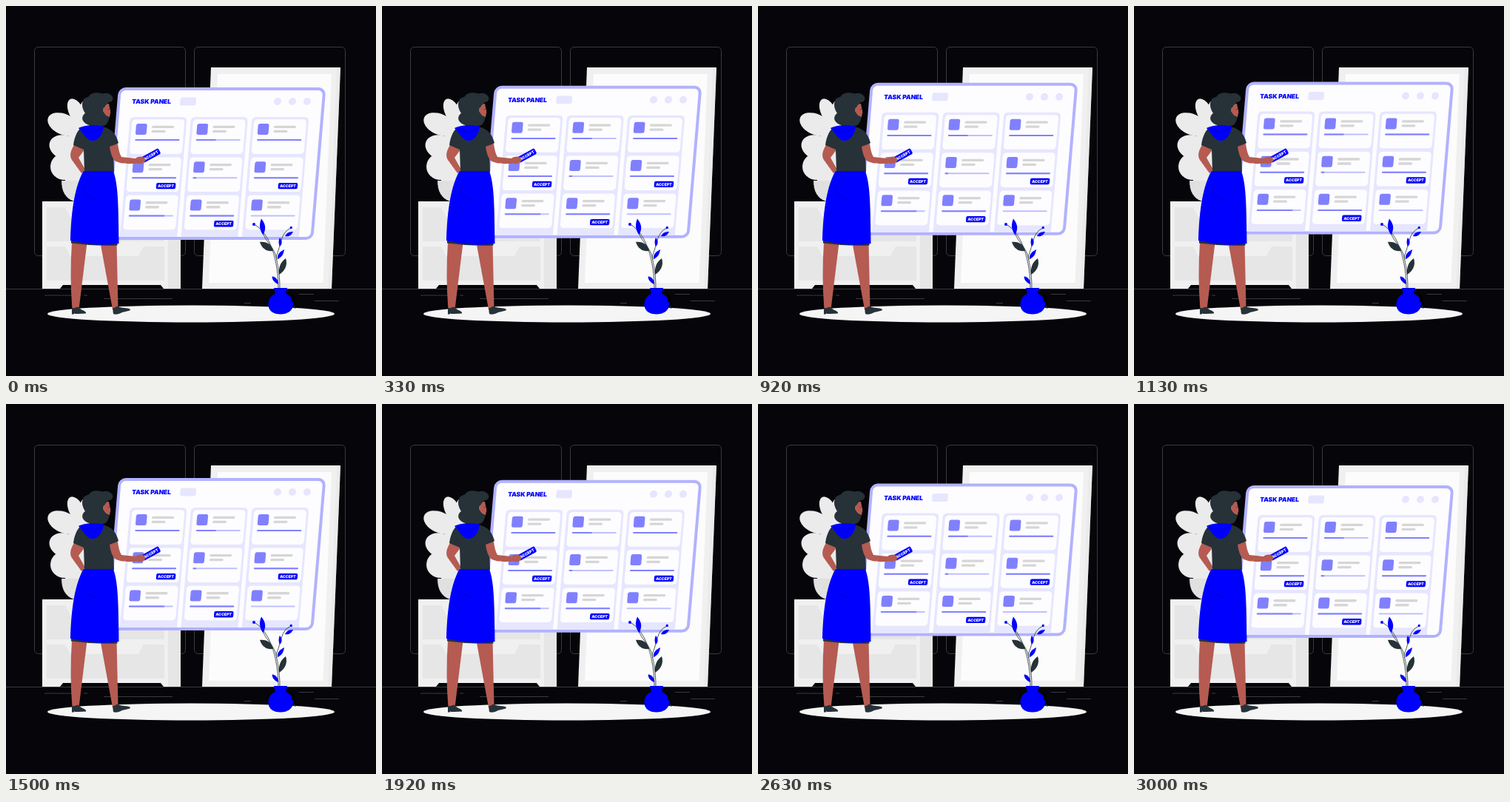
An HTML page that plays this animation: 500x500 px, repeating every 3.04 s.

```html
<!DOCTYPE html>
<html lang="en">
<head>
<meta charset="utf-8">
<title>Task panel</title>
<style>
  html, body { margin: 0; width: 100%; height: 100%; overflow: hidden; background: #060509; }
  svg { display: block; width: 100vw; height: 100vh; }
  text { font-family: Inter, "Liberation Sans", sans-serif; font-weight: 900; }
  .blue { fill: #0000ff; }
  .dark { fill: #263238; }
  .skin { fill: #b55b52; }
  .lilac { fill: #e6e6ff; }
  .violet { fill: #8080ff; }
  .thin { fill: none; stroke: #3b3b3f; stroke-width: 1; }
  .stem { fill: none; stroke: #263238; stroke-width: .8; }
</style>
</head>
<body>
<svg viewBox="0 0 500 500">
  <!-- room -->
  <g class="thin">
    <rect x="38.5" y="55.5" width="204" height="282" rx="5"/>
    <rect x="254.5" y="55.5" width="204" height="282" rx="5"/>
    <path d="M0 382.5H500M52 391H92M105 391H110M132 395.5H225M396 389.5H416M417 398.5H450M322 401.5H331"/>
  </g>

  <!-- canvas leaning on the wall -->
  <path fill="#f0f0f0" d="M277 83H452L440 382H265Z"/>
  <path fill="#e8e8e8" d="M452 83L440 382H435L447 83Z" opacity=".5"/>
  <path fill="#fcfcfc" d="M286 92H440L428.500 374H274Z"/>

  <!-- pale plant -->
  <g fill="#ebebeb">
    <ellipse cx="95" cy="143" rx="10" ry="19" transform="rotate(-25 95 143)"/>
    <ellipse cx="78" cy="160" rx="23" ry="14" transform="rotate(24 78 160)"/>
    <ellipse cx="79" cy="191" rx="21" ry="16" transform="rotate(20 79 191)"/>
    <ellipse cx="79" cy="217" rx="19" ry="18"/>
    <ellipse cx="106" cy="152" rx="8" ry="24"/>
    <path d="M86 160H106V236H80Z"/>
  </g>
  <path fill="#e0e0e0" d="M75 236H115V264H92C80 260 75 250 75 236Z"/>

  <!-- cabinet -->
  <path fill="#f0f0f0" d="M49 264H219V382H213L209 377H77L73 382H49Z"/>
  <path fill="#e6e6e6" d="M219 264H236V382H219Z"/>
  <g fill="#e6e6e6">
    <path id="drawer" d="M55 272H80L87 285H179L186 272H214V318H55Z"/>
    <use href="#drawer" y="53"/>
  </g>
  <ellipse cx="250" cy="416" rx="194" ry="11.500" fill="#f5f5f5"/>

  <g id="panel">
    <rect x="154" y="112" width="276.500" height="202" rx="8" fill="#fdfdff" stroke="#b2b2ff" stroke-width="4"/>
    <text x="171.800" y="132.300" font-size="8.400" class="blue">TASK PANEL</text>
    <rect x="237" y="123.500" width="21.500" height="11" rx="2.500" class="lilac"/>
    <g class="lilac">
      <circle cx="368.600" cy="129" r="5"/><circle cx="388.600" cy="129" r="5"/><circle cx="408.600" cy="129" r="5"/>
    </g>
    <g id="cards"></g>
  </g>

  <!-- vase and sprigs -->
  <path class="stem" d="M368 382C368 345 357 306 335 295M370 382C370 350 363 340 366 336C372 322 371 306 385 300M366 343C363 325 351 320 347 306"/>
  <g class="dark">
    <path d="M343 319C353 318 359 323 361 331C352 332 346 328 343 319Z"/>
    <path d="M378 341C381 350 377 358 369 363C368 353 371 346 378 341Z"/>
  </g>
  <g class="blue">
    <circle cx="335" cy="295" r="2"/><circle cx="385.300" cy="299.500" r="1.700"/>
    <path d="M345 287.500C352 296 351 302 347.500 309.500C342 302 342 295 345 287.500Z"/>
    <path d="M388 305C385 311 381 312 377 311C379 307 382 305 388 305Z"/>
    <path d="M370 313C374 318 373 322 370 325C368 321 368 317 370 313Z"/>
    <path d="M376 329C375 336 372 340 367 342C366 336 370 332 376 329Z"/>
    <path d="M359.500 365.500C365 366 368 370 368 376C363 374 360 371 359.500 365.500Z"/>
    <path d="M362 381H380L378 389C385 391 388 397 388 403C388 412 380 416.500 371 416.500C361 416.500 354.500 412 354.500 403C354.500 397 358 391 364 389Z"/>
  </g>
  <path d="M385 390Q391 394 387 398Q393 402 388 407" fill="none" stroke="#000" stroke-width="2"/>
  <path d="M389 405L391 409" stroke="#263238" stroke-width="1"/>

  <!-- woman -->
  <g class="skin">
    <path d="M89 320H109.500L98.500 410H89.500C87 380 87 350 89 320Z"/>
    <path d="M127.500 320H149.500L151.500 408L144 410Z"/>
    <path d="M93 186C87 196 85.500 202 89 208L102 226L107 221L98 205L107 193Z"/>
  </g>
  <g class="dark">
    <path d="M89 408C93 409 96 406 98 407C101 411 106 411 108 414V415.500L98 416H93L92 415V416.500H89Z"/>
    <path d="M144 408C147 409 149 405 152 406C157 409 163 407 168 410C168 413 160 412 155 415C151 417 147 417 145 416Z"/>
    <path d="M88 314H150.500V323.500C130 324.500 108 323 88 320.500Z"/>
    <path d="M101 165C95 170 92 180 91 188L105 194L106 224H146L145 190L152 185C149 174 144 166 130 163Z"/>
  </g>
  <path class="blue" d="M104.500 223H145C151 240 152 262 152.500 321C126 325 107 321 87 317C88 285 91 248 104.500 223Z"/>
  <path d="M105 247C107 256 115 262 127 262" fill="none" stroke="#0000b0" stroke-width=".7"/>
  <path class="skin" d="M131 139C132 134 136 132 139 132C140 138 142 143 141 145L140 150C137 152 134 149 131 145Z"/>
  <path class="dark" d="M104 128C106 123 110 124 112 122C116 116 125 117 130 118.500C137 116 144 120 144.500 125C144 128 142 130 139 130C137 132 135 133 133 137C130 137 130 142 133 145C135 149 138 149 140 150C138 155 138 161 131 162C121 164 108 162 104 155C102 151 104 147 107 145C103 139 102 133 104 128Z"/>
  <path d="M137.500 140L139.500 139" stroke="#263238" stroke-width=".8"/>
  <path class="blue" d="M98 165C107 160 126 160 132 163C131 173 125 182 117 182C109 182 106 174 98 165Z"/>
  <path d="M103 166C111 172 121 171 129 165" fill="none" stroke="#0000b0" stroke-width=".7"/>

  <!-- held label, hand over it -->
  <g transform="translate(196 202) rotate(-29)">
    <rect x="-13" y="-4.200" width="26" height="8.400" rx="1.800" class="blue"/>
    <text y="1.900" font-size="5.200" fill="#fff" text-anchor="middle">ACCEPT</text>
  </g>
  <path class="skin" d="M140 190L151 186C152 193 153 199 156 204L175 206C179 203 184 203 187 205C189 207 187 208 188 210C186 213 181 214 177 212.500C165 214 153 213 147 209C143 205 141 197 140 190Z"/>
</svg>
<script>
  const SLANT = 0.084, COL_STEP = 82.4, ROW_STEP = 51.2;
  const LOOP = 3040, FLOAT = 3000, LIFT = 10;
  const panel = document.getElementById("panel");

  // progress per card, row by row
  const progress = [[1, .45, 1], [1, .08, 1], [.81, 1, 0]];
  const accepted = new Set(["1,0", "1,2", "2,1"]);

  const bar = (x, y, w, h, r, paint) =>
    `<rect x="${x}" y="${y}" width="${w}" height="${h}" rx="${r}" ${paint}/>`;

  const acceptButton = () =>
    bar(214.2, 238.9 - ROW_STEP, 26.2, 8.4, 1.8, 'class="blue"') +
    `<text x="227.3" y="${245 - ROW_STEP}" font-size="5.2" fill="#fff" text-anchor="middle">ACCEPT</text>`;

  function card(row, col) {
    const done = progress[row][col];
    return `<g transform="translate(0 ${row * ROW_STEP})">` +
      bar(174.3, 153.3, 70.8, 46.6, 4.5, 'fill="#fdfdff"') +
      bar(180.2, 159, 14.8, 15, 2.5, 'class="violet"') +
      bar(201.6, 161.7, 30, 3.3, 1.6, 'fill="#d6d6d6"') +
      bar(201.6, 167.7, 19, 3.3, 1.6, 'fill="#d6d6d6"') +
      bar(180.4, 180.1, 60, 2, 1, 'fill="#c0c0ff"') +
      bar(180.4, 180.1, 60 * done, 2, 1, 'class="violet"') +
      (accepted.has(`${row},${col}`) ? acceptButton() : "") + "</g>";
  }

  const column = col => `<g transform="translate(${col * COL_STEP} 0)">` +
    '<path class="lilac" d="M171 312V156Q171 150 177 150H242Q248 150 248 156V312Z"/>' +
    [0, 1, 2].map(row => card(row, col)).join("") + "</g>";

  document.getElementById("cards").innerHTML = [0, 1, 2].map(column).join("");

  function draw(ms) {
    const phase = Math.min(ms % LOOP, FLOAT) / FLOAT;
    const rise = LIFT * (1 - Math.abs(2 * phase - 1));
    panel.setAttribute("transform", `matrix(1 0 ${-SLANT} 1 ${SLANT * 110} ${-rise})`);
  }

  const start = performance.now();
  function tick() {
    draw(performance.now() - start);
    requestAnimationFrame(tick);
  }
  draw(0);
  requestAnimationFrame(tick);
</script>
</body>
</html>
```
